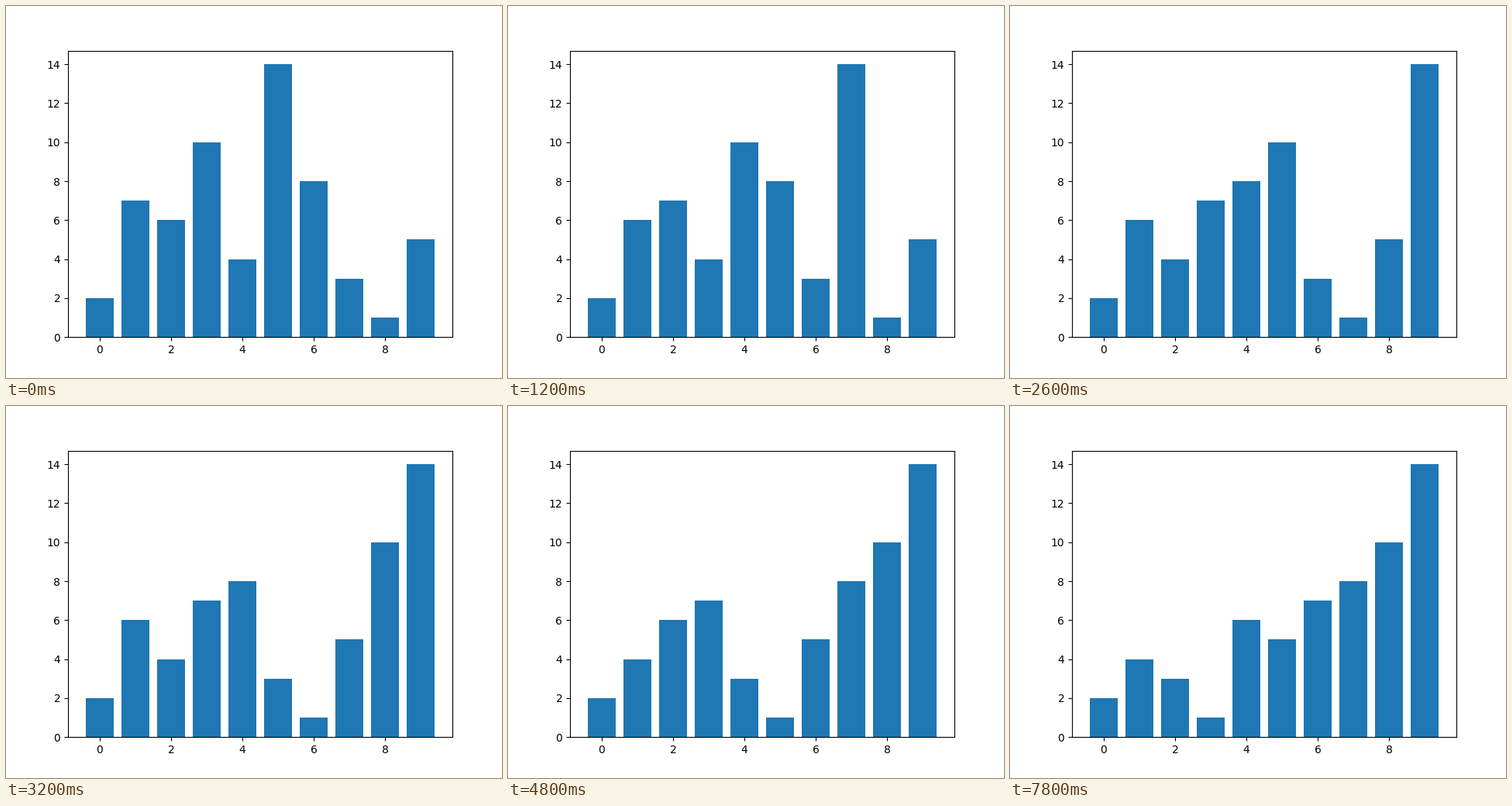
Write a matplotlib script that moves like this. It is 640 px wide and 480 px high and loops after 8 s.

```python
import matplotlib.pyplot as plt
from matplotlib.animation import FuncAnimation

VALUES = [2, 7, 6, 10, 4, 14, 8, 3, 1, 5]
FRAMES = 40
STEP_MS = 200


def bubble_sort(values, steps):
    """Return the values after the given number of comparisons."""
    data = list(values)
    pairs = len(data) - 1
    for step in range(steps):
        j = step % pairs
        if data[j] > data[j + 1]:
            data[j], data[j + 1] = data[j + 1], data[j]
    return data


fig, ax = plt.subplots(figsize=(6.4, 4.8), dpi=100)
bars = ax.bar(range(len(VALUES)), VALUES)


def update(frame):
    for bar, height in zip(bars, bubble_sort(VALUES, frame + 1)):
        bar.set_height(height)
    return list(bars)


def init():
    return update(0)


anim = FuncAnimation(fig, update, frames=FRAMES, init_func=init,
                     interval=STEP_MS, repeat=True, repeat_delay=0, blit=False)
plt.show()
```
